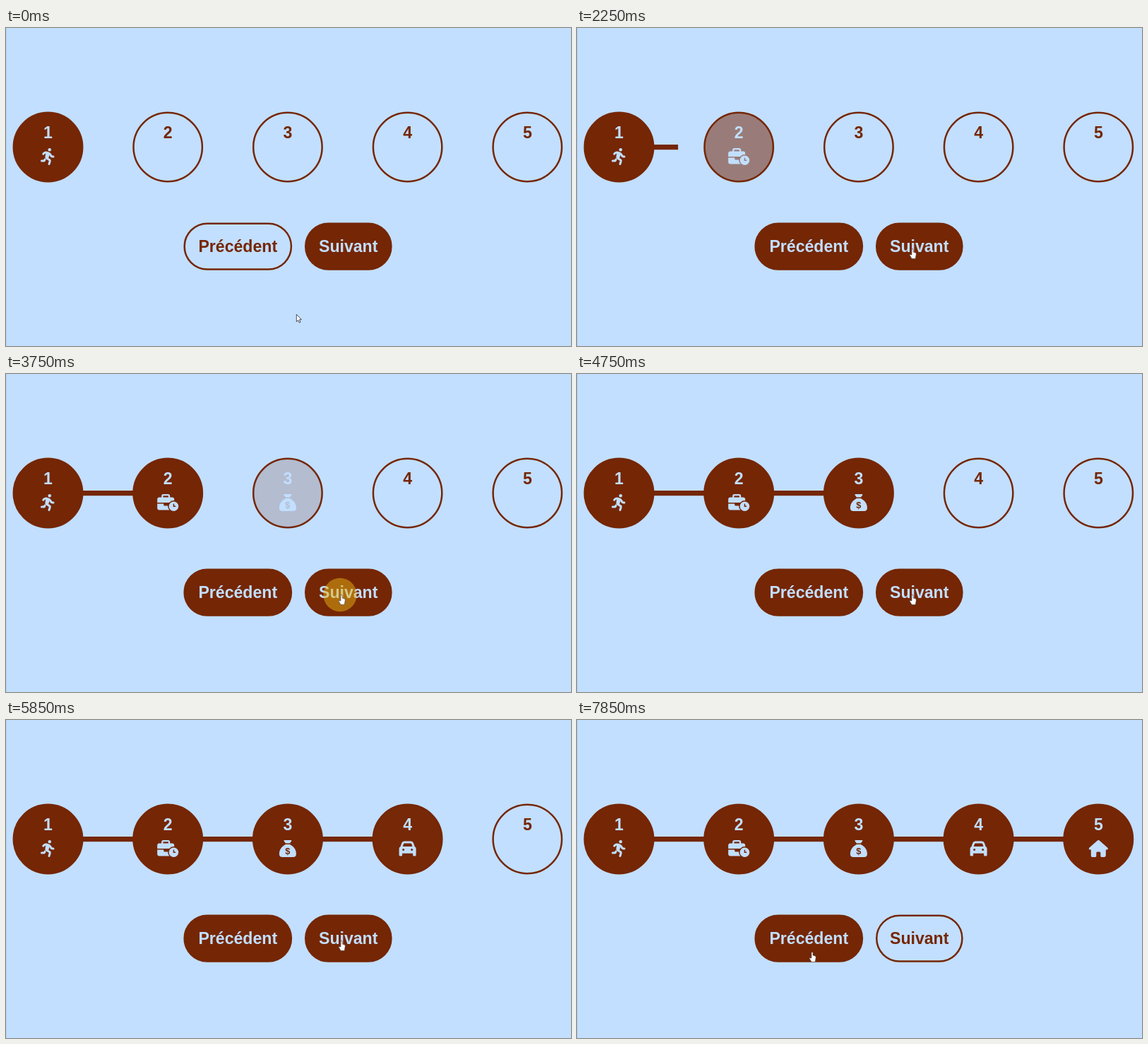
Write an HTML page that moves like this. It is 800x450 px and loops after 8000 ms.

```html
<!DOCTYPE html>
<html lang="fr">
<head>
<meta charset="utf-8">
<title>Étapes</title>
<style>
  html, body { margin: 0; width: 100%; height: 100%; overflow: hidden; background: #c2dfff; }
  svg { display: block; width: 100vw; height: 100vh; }
  text { font: bold 23.1px "Liberation Sans", Arial, sans-serif; text-anchor: middle; }
  .step { color: #c2dfff; fill: #c2dfff; }
  .icon .line { fill: none; stroke: #c2dfff; stroke-width: 64; stroke-linecap: round; stroke-linejoin: round; }
  .icon .cut { fill: currentColor; }
  .icon .cutline { fill: none; stroke: currentColor; stroke-width: 32; stroke-linecap: round; }
  .icon text { font-size: 270px; }
</style>
</head>
<body>
<svg viewBox="0 0 800 450">
  <rect width="800" height="450" fill="#c2dfff"/>
  <rect width="1" height="450" fill="#b3d0f0"/>
  <rect id="bar" x="10" y="165" height="7.2" fill="#752604"/>
  <g id="steps"></g>
  <g id="previous">
    <rect x="252.7" y="276.7" width="151.2" height="64.8" rx="32.4" stroke="#752604" stroke-width="2.5"/>
    <text x="328.3" y="317">Précédent</text>
  </g>
  <g id="next">
    <rect x="424.2" y="276.7" width="121.2" height="64.8" rx="32.4" stroke="#752604" stroke-width="2.5"/>
    <text x="484.7" y="317">Suivant</text>
  </g>
  <circle id="ripple" cx="473" cy="312.5" fill="#e8b414" fill-opacity=".5"/>
  <g id="cursor">
    <path id="arrow" fill="#fff" stroke="#223" stroke-width=".8" d="M.3 .3V10.6L2.7 8.4 4.3 12 6 11.2 4.4 7.7H7.4Z"/>
    <path id="hand" fill="#fff" stroke="#333" stroke-width=".6" d="M-1.1 1Q0-.6 1.1 1V5L4 5.8Q5.6 6.3 5.3 8.2L4.3 14.4H-1L-3.9 9.4Q-4.4 7.6-1.1 9Z"/>
    <g id="blocked" fill="none">
      <circle r="4.4" stroke="#fff" stroke-width="2.8"/>
      <path d="M-3-3 3 3" stroke="#fff" stroke-width="2.6"/>
      <circle r="4.4" stroke="#cf2020" stroke-width="1.5"/>
      <path d="M-3-3 3 3" stroke="#cf2020" stroke-width="1.5"/>
    </g>
  </g>
</svg>
<script>
const LOOP = 8000;
const BLUE = [194, 223, 255], BROWN = [117, 38, 4];
const STEP_TIMES = [-2000, 1940, 3600, 5000, 6305];
const PRESS_LEAD = 145, RIPPLE_TIME = 350;
const FILL_TIME = 1000, BAR_TIME = 775, BAR_STEP = 194.5;

// Each icon is drawn on a grid 512 units high.
const ICONS = [
  { width: 448, art: `
    <circle cx="272" cy="48" r="48"/>
    <path d="M160 130 138 254Q126 306 166 330L236 302 284 172Z"/>
    <path class="line" d="M80 176 103 153Q128 128 163 128 176 128 188 132L237 147Q285 162 304 208 320 256 363 256H384"/>
    <path class="line" d="M190 308 267 355Q290 369 283 392L256 480M32 384H102Q112 384 116 375L130 342"/>` },
  { width: 640, art: `
    <path class="line" style="stroke-width:48" d="M152 108V56Q152 24 184 24H328Q360 24 360 56V108"/>
    <path d="M0 256V160Q0 96 64 96H448Q512 96 512 160V256Z"/>
    <path d="M0 288H192V320Q192 352 224 352H400V480H64Q0 480 0 416Z"/>
    <circle class="cut" cx="496" cy="368" r="176"/>
    <circle cx="496" cy="368" r="144"/>
    <path class="cutline" d="M496 304V368H544"/>` },
  { width: 512, art: `
    <path d="M192 96 144 25Q134 0 158 0H354Q378 0 368 25L320 96Z"/>
    <path d="M192 128H320C400 178 512 254 512 416Q512 512 416 512H96Q0 512 0 416C0 254 112 178 192 128Z"/>
    <text class="cut" x="256" y="418">$</text>` },
  { width: 512, art: `
    <path d="M40 197 75 96Q98 32 165 32H347Q414 32 437 96L472 197Q512 214 512 256V448Q512 480 480 480H448Q416 480 416 448V400H96V448Q96 480 64 480H32Q0 480 0 448V256Q0 214 40 197Z"/>
    <path class="cut" d="M109 192 135 117Q143 96 165 96H347Q369 96 377 117L403 192Z"/>
    <circle class="cut" cx="128" cy="288" r="32"/><circle class="cut" cx="384" cy="288" r="32"/>` },
  { width: 576, art: `
    <path d="M576 256Q576 288 544 288H512V448Q512 512 456 512H392Q352 512 352 472V384Q352 352 320 352H256Q224 352 224 384V472Q224 512 184 512H120Q64 512 64 456V288H32Q0 288 0 256 0 240 12 231L266 8Q288-8 310 8L564 231Q576 240 576 256Z"/>` }
];

const $ = id => document.getElementById(id);
const clamp = v => Math.min(1, Math.max(0, v));
const mix = (a, b, p) => a + (b - a) * p;
const smooth = p => p * p * (3 - 2 * p);
const rgb = p => `rgb(${BLUE.map((c, i) => Math.round(mix(c, BROWN[i], p)))})`;
const show = (element, visible) => { element.style.display = visible ? '' : 'none'; };

// CSS "ease": cubic-bezier(.25, .1, .25, 1)
function ease(x) {
  if (x <= 0 || x >= 1) return clamp(x);
  let low = 0, high = 1;
  for (let i = 0; i < 20; i++) {
    const s = (low + high) / 2;
    if (.75 * s * (1 - s) + s ** 3 < x) low = s; else high = s;
  }
  return .3 * low * (1 - low) ** 2 + 3 * low * low * (1 - low) + low ** 3;
}

$('steps').innerHTML = ICONS.map(({ width, art }, i) => `
  <g class="step" transform="translate(${59.5 + 169.7 * i} 168.5)">
    <circle r="48.7" stroke="#752604" stroke-width="2.5"/>
    <text y="-12.5">${i + 1}</text>
    <g class="icon" transform="translate(0 13.5) scale(.0469) translate(${-width / 2} -256)">${art}</g>
  </g>`).join('');

const steps = [...$('steps').children].map(group => ({
  group,
  disc: group.querySelector('circle'),
  number: group.querySelector('text'),
  icon: group.querySelector('.icon')
}));

// Pointer stops: time, x, y
const POINTER = [[450, 411, 405], [1250, 475, 312], [6950, 475, 312], [7700, 330, 333], [7850, 333, 328]];

function pointerAt(time) {
  const next = POINTER.findIndex(stop => stop[0] > time);
  if (next === 0) return POINTER[0].slice(1);
  if (next < 0) return POINTER.at(-1).slice(1);
  const [t0, x0, y0] = POINTER[next - 1], [t1, x1, y1] = POINTER[next];
  const p = smooth((time - t0) / (t1 - t0));
  return [mix(x0, x1, p), mix(y0, y1, p)];
}

function paintButton(id, enabled) {
  const [box, label] = $(id).children;
  box.setAttribute('fill', rgb(enabled ? 1 : 0));
  label.setAttribute('fill', rgb(enabled ? 0 : 1));
}

function paintCursor(time, current) {
  const [x, y] = pointerAt(time);
  const inRow = y > 275 && y < 342;
  const overPrevious = inRow && x > 251 && x < 405;
  const overNext = inRow && x > 423 && x < 547;
  const blocked = overPrevious && current === 0 || overNext && current === 4;
  const hand = (overPrevious || overNext) && !blocked;
  show($('blocked'), blocked);
  show($('hand'), hand);
  show($('arrow'), !blocked && !hand);
  $('cursor').setAttribute('transform', `translate(${x - (blocked ? 1 : 0)} ${y + (blocked ? 1 : 0)})`);
}

function draw(time) {
  let current = 0, barSteps = 0, ripple = 0;
  steps.forEach(({ group, disc, number, icon }, i) => {
    const elapsed = time - STEP_TIMES[i], active = elapsed >= 0;
    const color = rgb(ease(elapsed / FILL_TIME));
    group.style.color = color;
    disc.setAttribute('fill', color);
    number.setAttribute('fill', rgb(active ? 0 : 1));
    show(icon, active);
    if (i === 0) return;
    if (active) current = i;
    barSteps += ease(elapsed / BAR_TIME);
    const pressed = (elapsed + PRESS_LEAD) / RIPPLE_TIME;
    if (pressed > 0 && pressed < 1) ripple = 28 * pressed;
  });
  $('bar').setAttribute('width', BAR_STEP * barSteps);
  $('ripple').setAttribute('r', ripple);
  paintButton('previous', current > 0);
  paintButton('next', current < 4);
  paintCursor(time, current);
}

const start = performance.now();
function frame() {
  draw((performance.now() - start) % LOOP);
  requestAnimationFrame(frame);
}
frame();
</script>
</body>
</html>
```
